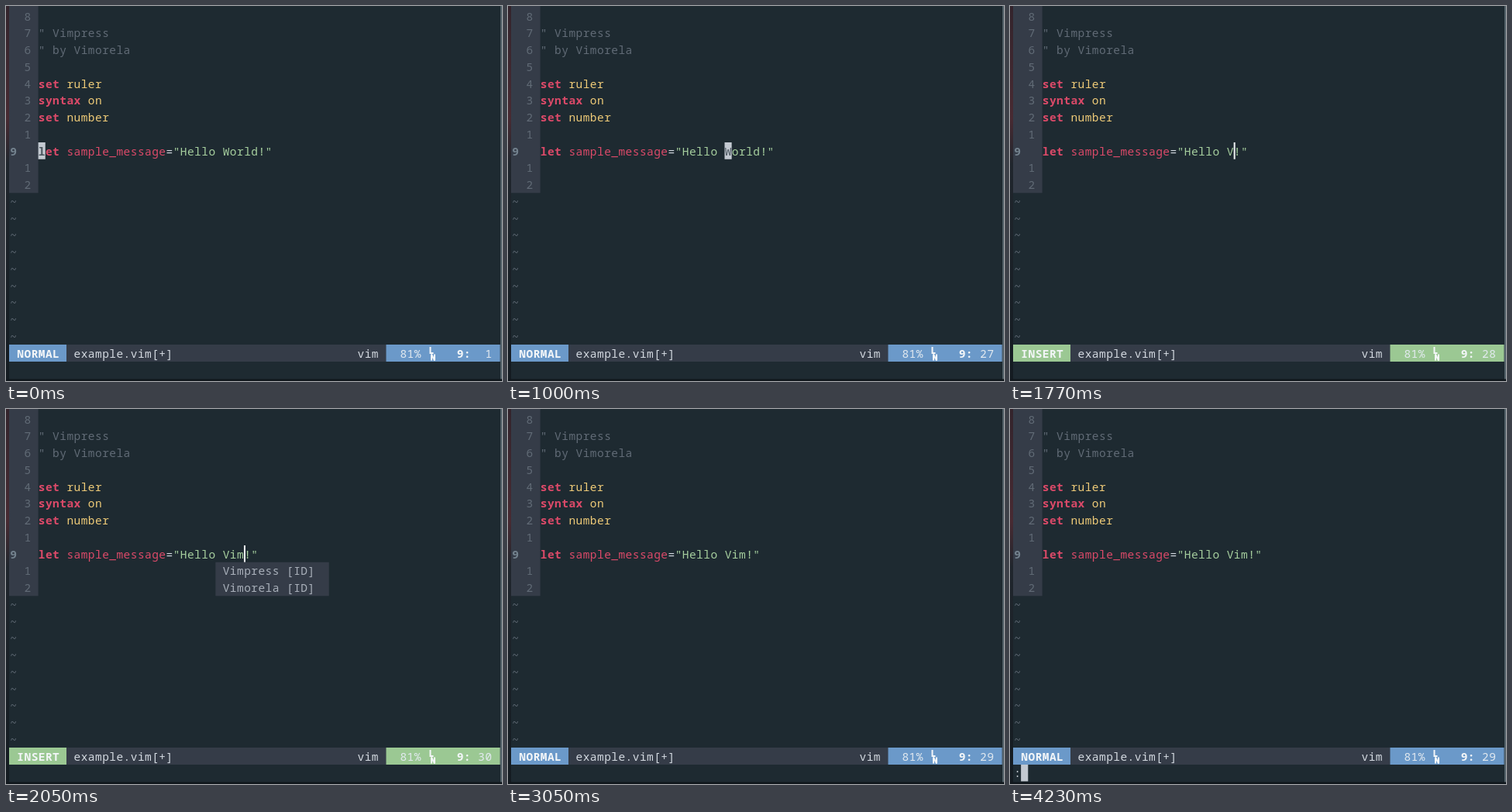
Recreate the animation shown at these times as an HTML page. Size 640 by 484 pixels, loop 4.28 s.

```html
<!DOCTYPE html>
<html lang="en">
<head>
<meta charset="utf-8">
<title>Vim editing</title>
<style>
  html, body { margin: 0; width: 100%; height: 100%; overflow: hidden; background: #1e2a31; }
  svg { display: block; width: 640px; height: 484px; }
  text { white-space: pre; font: 14.5px "Noto Sans Mono", monospace; letter-spacing: .45px; }
  .bold { font-weight: 700; }
</style>
</head>
<body>
<svg viewBox="0 0 640 484">
  <defs>
    <linearGradient id="edge" x2="0" y2="1">
      <stop offset="0" stop-color="#33242c"/>
      <stop offset=".3" stop-color="#482a32"/>
      <stop offset=".42" stop-color="#20262d"/>
      <stop offset="1" stop-color="#141b21"/>
    </linearGradient>
  </defs>
  <rect width="640" height="484" fill="#1e2a31"/>
  <rect width="4" height="484" fill="url(#edge)"/>
  <rect x="638" width="2" height="484" fill="#56646c"/>
  <rect y="481.5" width="640" height="2.5" fill="#10171c"/>
  <g id="base"></g>
  <g id="live"></g>
</svg>
<script>
const LOOP = 4280, CELL = 9.15, ROW = 21.75, LEFT = 5, TOP = 2, CODE = 4;
const PANEL = '#353c48', GREY = '#616b76', RED = '#dc4a69', YELLOW = '#efcb78',
      GREEN = '#a6cf9e', LIGHT = '#d3d9e0', CURSOR = '#c3c9d1';
const $ = id => document.getElementById(id);
const colX = c => LEFT + c * CELL;
const rowY = r => TOP + r * ROW;

const text = (c, r, s, fill, bold) =>
  `<text x="${colX(c) + .2}" y="${rowY(r) + 16.6}" fill="${fill}"${bold ? ' class="bold"' : ''}>${s}</text>`;
const box = (c, r, w, h, fill) =>
  `<rect x="${colX(c)}" y="${rowY(r)}" width="${w * CELL}" height="${h * ROW}" fill="${fill}"/>`;
const command = (r, word, arg) =>
  text(CODE, r, word, RED, true) + text(CODE + word.length + 1, r, arg, YELLOW);

function drawBase() {
  let out = `<rect x="4" y="0" width="${colX(4) - 4}" height="${rowY(11)}" fill="${PANEL}"/>`;
  for (let r = 0; r < 11; r++) {
    out += r === 8 ? text(0, r, '9', '#73828e', true) : text(2, r, Math.abs(8 - r), GREY);
  }
  for (let r = 11; r < 20; r++) out += text(0, r, '~', GREY);
  out += text(CODE, 1, '" Vimpress', GREY) + text(CODE, 2, '" by Vimorela', GREY);
  out += command(4, 'set', 'ruler') + command(5, 'syntax', 'on') + command(6, 'set', 'number');
  out += text(CODE, 8, 'let', RED, true) + text(8, 8, 'sample_message', RED) + text(22, 8, '=', LIGHT);
  out += `<rect x="4" y="437" width="634" height="22" fill="${PANEL}"/>`;
  out += text(9, 20, 'example.vim[+]', LIGHT) + text(49, 20, 'vim', LIGHT);
  $('base').innerHTML = out;
}

// Each step updates part of the editor state at its time.
const steps = [
  [0, { mode: 'NORMAL', col: 1, word: 'World', menu: false, shown: true, prompt: false }],
  [300, { col: 5 }],
  [500, { col: 19 }],
  [650, { col: 21 }],
  [800, { col: 27 }],
  [1250, { mode: 'INSERT', word: '' }],
  [1650, { word: 'V', col: 28 }],
  [1800, { word: 'Vi', col: 29, menu: true }],
  [1950, { word: 'Vim', col: 30 }],
  [2250, { mode: 'NORMAL', col: 29, menu: false }],
  [2800, { shown: false }],
  [3300, { shown: true }],
  [3700, { prompt: true }]
];

function drawCursor(s, line) {
  if (!s.shown) return '';
  if (s.prompt) return box(1, 21, 1, 1, CURSOR);
  const c = CODE + s.col - 1;
  if (s.mode === 'INSERT') return box(c, 8, .22, 1, '#eef1f4');
  return box(c, 8, 1, 1, CURSOR) + text(c, 8, line[s.col - 1], '#4b565f', s.col < 4);
}

function drawLive(s) {
  const accent = s.mode === 'INSERT' ? '#9bc893' : '#6b99c9';
  const string = `"Hello ${s.word}!"`;
  let out = text(23, 8, string, GREEN);
  out += drawCursor(s, 'let sample_message=' + string);
  if (s.menu) {
    out += box(29, 9, 16, 2, PANEL);
    ['Vimpress', 'Vimorela'].forEach((w, i) => out += text(30, 9 + i, w + ' [ID]', '#a9b0ba'));
  }
  out += `<rect x="4" y="437" width="74" height="22" fill="${accent}"/>`;
  out += `<rect x="490.5" y="437" width="147" height="22" fill="${accent}"/>`;
  out += text(1, 20, s.mode, '#f3f6f8', true) + text(55, 20, '81%', '#e3eaf0');
  out += '<path d="M547.5 440v8h4M549 457.5v-8l4 8v-8" fill="none" stroke="#f3f6f8" stroke-width="2"/>';
  out += text(63, 20, '9:', '#f3f6f8', true) + text(66, 20, String(s.col).padStart(2), '#e3eaf0');
  if (s.prompt) out += text(0, 21, ':', LIGHT);
  $('live').innerHTML = out;
}

let current = -1;
function tick() {
  const t = performance.now() % LOOP;
  const count = steps.filter(([at]) => at <= t).length;
  if (count !== current) {
    current = count;
    drawLive(Object.assign({}, ...steps.slice(0, count).map(([, change]) => change)));
  }
  requestAnimationFrame(tick);
}

drawBase();
tick();
</script>
</body>
</html>
```
